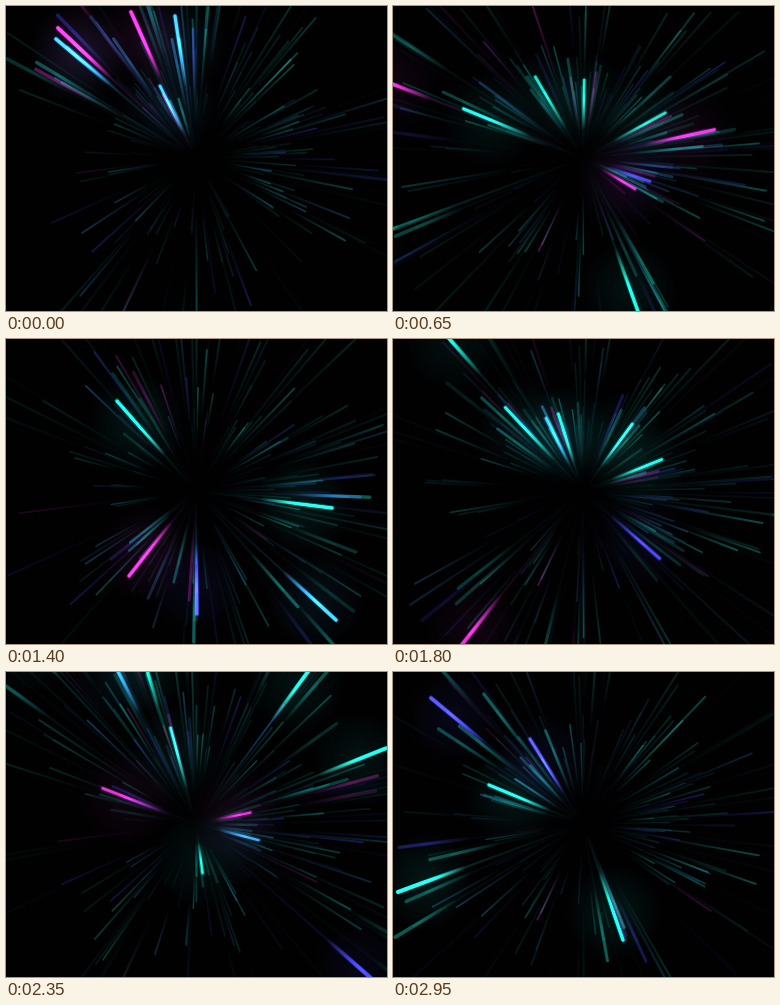
Recreate the animation shown at these times as an HTML page with a canvas. Size 381 by 305 pixels, loop 3 s.

```html
<!DOCTYPE html>
<html lang="en">
<head>
<meta charset="utf-8">
<title>Light streaks</title>
<style>
html, body { margin: 0; width: 100%; height: 100%; overflow: hidden; background: #000; }
canvas { display: block; }
</style>
</head>
<body>
<canvas id="stage" width="381" height="305"></canvas>
<script>
const ctx = document.getElementById('stage').getContext('2d');
const LOOP = 3000, STEP = 50, CX = 190, CY = 152, GROWTH = 0.0016;
const COLORS = { m: '255,50,230', b: '72,72,255', c: '30,250,225', s: '55,175,255' };

// The leading streaks of each burst: colours and head positions at its peak.
const bursts = [
  { peak: 0, colors: 'msmss', heads: [52,22, 50,33, 125,6, 169,10, 154,80] },
  { peak: 400, colors: 'cmmcc', heads: [110,119, 43,95, 278,133, 22,214, 228,258] },
  { peak: 950, colors: 'cccbm', heads: [192,26, 113,21, 323,79, 298,190, 274,202] },
  { peak: 1400, colors: 'ccmbs', heads: [111,62, 326,169, 123,237, 191,275, 330,281] },
  { peak: 2150, colors: 'cscccb', heads: [54,6, 125,25, 147,17, 276,35, 328,97, 324,270] },
  { peak: 2600, colors: 'cmmsc', heads: [152,9, 51,99, 271,135, 283,176, 200,225] },
  { peak: 2950, colors: 'bbccc', heads: [38,26, 137,67, 96,113, 5,220, 230,268] }
];

let seed = 41;
const random = () => (seed = seed * 16807 % 2147483647) / 2147483647;
const between = (a, b) => a + (b - a) * random();
const pickColor = () => COLORS['ccccccssbbm'[Math.floor(random() * 11)]];

// Every leading streak carries a few fainter ones beside it.
const streaks = bursts.flatMap(({ peak, colors, heads }, i) =>
  [...colors].flatMap((key, n) => {
    const dx = heads[2 * n] - CX, dy = heads[2 * n + 1] - CY;
    const lead = {
      peak, angle: Math.atan2(dy, dx), r: Math.hypot(dx, dy), color: COLORS[key], alpha: 1,
      before: i ? peak - bursts[i - 1].peak : LOOP,
      after: i + 1 < bursts.length ? bursts[i + 1].peak - peak : LOOP
    };
    const followers = Array.from({ length: 4 }, () => ({
      ...lead, angle: lead.angle + between(-0.25, 0.25), r: lead.r * between(0.75, 1.3),
      color: pickColor(), alpha: between(0.12, 0.4)
    }));
    return [lead, ...followers];
  }));

// A field of dim rays, denser above and to the right.
const rays = Array.from({ length: 200 }, (_, i) => ({
  angle: i % 3 ? between(0, 2 * Math.PI) : between(-2.5, 0.6),
  phase: random(),
  period: between(900, 1500),
  tail: between(0.3, 0.65),
  alpha: 0.08 + random() ** 2 * 0.22,
  color: pickColor()
}));

function line(angle, from, to, color, alpha, width, solid = 0.9) {
  const ux = Math.cos(angle), uy = Math.sin(angle);
  const ends = [CX + ux * from, CY + uy * from, CX + ux * to, CY + uy * to];
  const fill = ctx.createLinearGradient(...ends);
  fill.addColorStop(0, `rgba(${color},0)`);
  fill.addColorStop(solid, `rgba(${color},${alpha.toFixed(3)})`);
  ctx.strokeStyle = fill;
  ctx.lineWidth = width;
  ctx.beginPath();
  ctx.moveTo(ends[0], ends[1]);
  ctx.lineTo(ends[2], ends[3]);
  ctx.stroke();
}

function glow(angle, r, color, alpha) {
  const x = CX + Math.cos(angle) * r, y = CY + Math.sin(angle) * r, size = 48;
  const fill = ctx.createRadialGradient(x, y, 0, x, y, size);
  fill.addColorStop(0, `rgba(${color},${alpha.toFixed(3)})`);
  fill.addColorStop(1, `rgba(${color},0)`);
  ctx.fillStyle = fill;
  ctx.fillRect(x - size, y - size, 2 * size, 2 * size);
}

function drawRay({ angle, phase, period, tail, alpha, color }, t) {
  const p = (phase + t / period) % 1;
  const r = 55 * Math.exp(1.6 * p);
  const fade = Math.min(1, p * 4, (1 - p) * 4);
  line(angle, r * tail, r, color, alpha * fade, 1.2 + p);
}

function drawStreak(s, t) {
  const dt = t - s.peak;
  const u = Math.abs(dt) / (dt < 0 ? s.before : s.after);
  if (u >= 1) return;
  const alpha = s.alpha * (1 - u * u);
  const r = s.r * Math.exp(dt * GROWTH);
  const length = Math.min(r * 0.64, 72);
  line(s.angle, 8, r - length * 0.3, s.color, alpha * 0.2, 2);
  if (s.alpha === 1) {
    glow(s.angle, r - length * 0.4, s.color, alpha * 0.09);
    line(s.angle, r - length, r, s.color, alpha * 0.3, 5, 0.7);
  }
  line(s.angle, r - length, r, s.color, alpha * 0.95, 2 + r / 130, 0.6);
}

function draw(now) {
  const t = Math.floor(now % LOOP / STEP) * STEP;
  ctx.globalCompositeOperation = 'source-over';
  ctx.fillStyle = '#010102';
  ctx.fillRect(0, 0, 381, 305);
  ctx.globalCompositeOperation = 'lighter';
  ctx.lineCap = 'round';
  rays.forEach(ray => drawRay(ray, t));
  streaks.forEach(s => drawStreak(s, t));
}

const start = performance.now();
function loop() {
  draw(performance.now() - start);
  requestAnimationFrame(loop);
}
loop();
</script>
</body>
</html>
```
